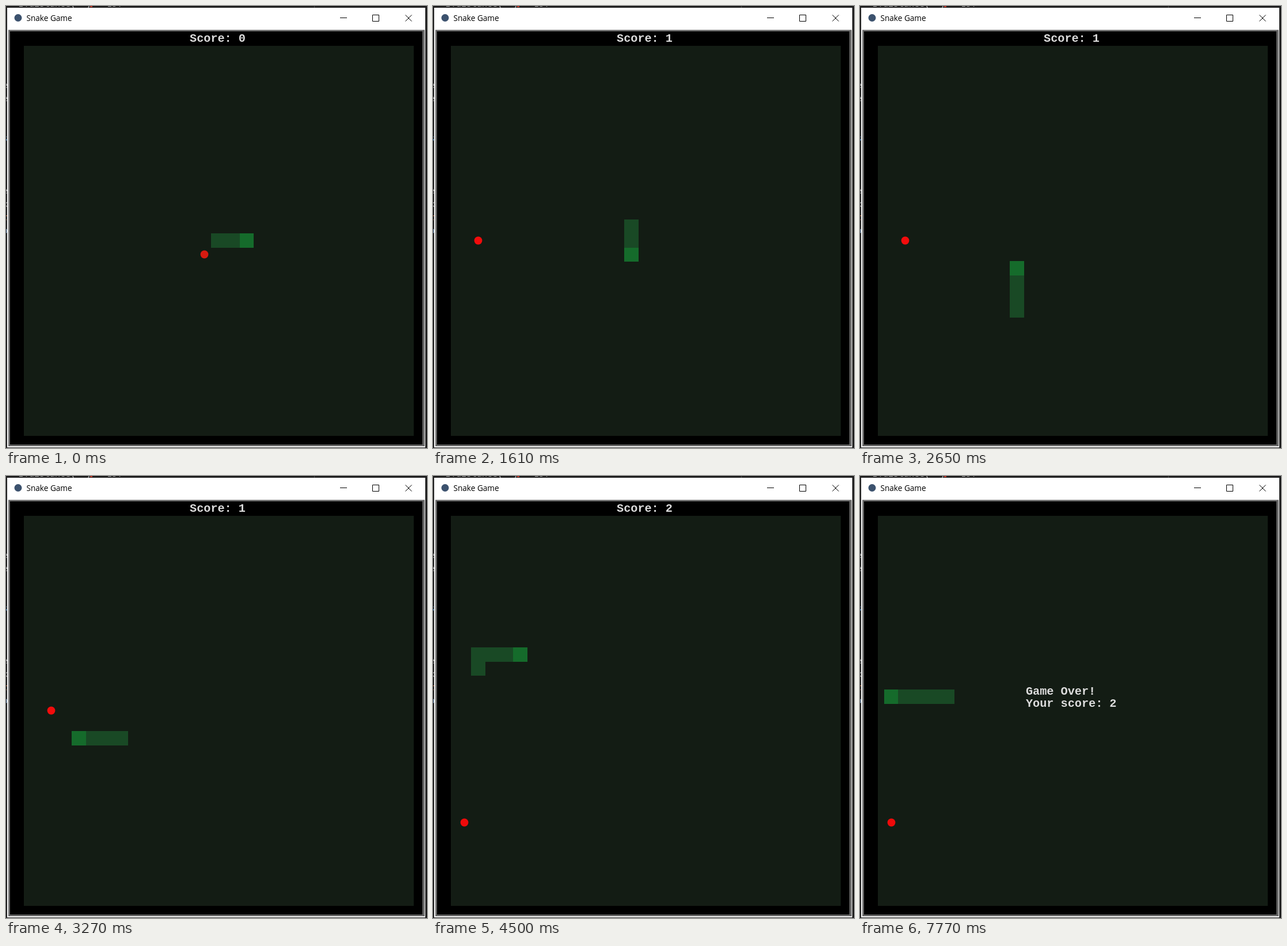
Write an HTML page with a canvas that moves like this. It is 731 px wide and 766 px high and loops after 8980 ms.

```html
<!DOCTYPE html>
<html lang="en">
<head>
<meta charset="utf-8">
<title>Snake Game</title>
<style>
  html, body { margin: 0; width: 100%; height: 100%; overflow: hidden; background: #1e1e1e; }
  canvas { display: block; }
</style>
</head>
<body>
<canvas id="stage" width="731" height="766"></canvas>
<script>
const ctx = document.getElementById('stage').getContext('2d');
const LOOP = 8980, STEP = 109, LEAD = 20, CELL = 24.2;
const MONO = 'bold 20.2px "Liberation Mono", "Courier New", monospace';

// Moments at which the screen refreshes
const TICKS = [0, 210, 410, 620, 820, 1020, 1230, 1430, 1610, 1840, 2040, 2250, 2450, 2650,
  2850, 3060, 3270, 3460, 3660, 3880, 4090, 4290, 4500, 4700, 4900, 5120, 5320, 5530];

// The route of the head in grid cells; the first two moves lay out the starting body
const DIRS = { R: [1, 0], L: [-1, 0], U: [0, -1], D: [0, 1] };
const route = [[13, 1]];
for (const [, dir, count] of 'R5 U2 L6 D7 L3 U3 L8 U6 R4 D3 L5'.matchAll(/(\w)(\d)/g)) {
  for (let i = 0; i < +count; i++) {
    const [x, y] = route.at(-1);
    route.push([x + DIRS[dir][0], y + DIRS[dir][1]]);
  }
}
const LAST = route.length - 3;
const MEALS = [14, 34];
const FOODS = [[12, 2, '#d51a10'], [1, 1, '#f20c0c'], [0, 9, '#ee0a0a']];

const left = col => Math.round(41.8 + CELL * col);
const top_ = row => Math.round(369.8 + CELL * row);

function rect(x, y, w, h, color) {
  ctx.fillStyle = color;
  ctx.fillRect(x, y, w, h);
}

function dot(x, y, r, color) {
  ctx.fillStyle = color;
  ctx.beginPath();
  ctx.arc(x, y, r, 0, 2 * Math.PI);
  ctx.fill();
}

function text(str, x, y, font, color, align = 'left') {
  ctx.font = font;
  ctx.fillStyle = color;
  ctx.textAlign = align;
  ctx.fillText(str, x, y);
}

function drawBackdrop() {
  const code = '15px "Noto Sans Mono", monospace';
  rect(0, 0, 731, 766, '#1e1e1e');
  text('r.distance(  ) < 15:', 22, 1, code, '#b8b8b8');
  rect(146, 0, 4, 2, '#c0392b');
  rect(535, 0, 1, 3, '#444');
  const edge = [[74, ')', '#d8cfa0'], [142, 'e', '#aaa'], [165, 'e', '#aaa'], [212, ')', '#d8cfa0'],
    [234, 's', '#5b9bd0'], [279, ':', '#777'], [325, 'e', '#aaa'], [348, 'x', '#aaa'],
    [371, 'r', '#c8774f'], [394, 'o', '#8aa6c8']];
  for (const [y, ch, color] of edge) text(ch, 3, y, code, color, 'right');
}

function drawWindow() {
  rect(2, 3, 726, 762, '#fff');
  rect(4, 41, 723, 722, '#696969');
  rect(4, 41, 723, 1, '#a0a0a0');
  rect(7, 44, 716, 716, '#000');
  rect(31, 69, 677, 676, '#131c14');
  dot(21, 20.5, 6.5, '#3c526e');
  text('Snake Game', 35.5, 26, '13.6px "Open Sans", "Noto Sans", sans-serif', '#000');

  ctx.strokeStyle = '#000';
  ctx.lineWidth = 1;
  ctx.beginPath();
  ctx.moveTo(580, 20.5);
  ctx.lineTo(592, 20.5);
  ctx.rect(636.5, 15.5, 11, 11);
  ctx.moveTo(693.5, 15.5);
  ctx.lineTo(704.5, 26.5);
  ctx.moveTo(704.5, 15.5);
  ctx.lineTo(693.5, 26.5);
  ctx.stroke();
}

function drawGame(time) {
  const now = TICKS.findLast(t => t <= time);
  const moves = Math.min(LAST, Math.floor((now + LEAD) / STEP));
  const score = MEALS.filter(m => moves >= m).length;
  const length = 3 + MEALS.filter(m => moves > m).length;

  const [col, row, red] = FOODS[score];
  dot(left(col) + 12.5, top_(row) + 12.5, 6.9, red);

  const head = moves + 2;
  for (let i = 0; i < length; i++) {
    const [x, y] = route[head - i];
    rect(left(x), top_(y), 25, 25, i ? '#194925' : '#156b2b');
  }

  if (moves < LAST) {
    text('Score: ' + score, 367.5, 62, MONO, '#dcdcdc', 'center');
  } else {
    text('Game Over!', 288, 379, MONO, '#dcdcdc');
    text('Your score: ' + score, 288, 400, MONO, '#dcdcdc');
  }
}

const start = performance.now();
function frame() {
  drawBackdrop();
  drawWindow();
  drawGame((performance.now() - start) % LOOP);
  requestAnimationFrame(frame);
}
frame();
</script>
</body>
</html>
```
